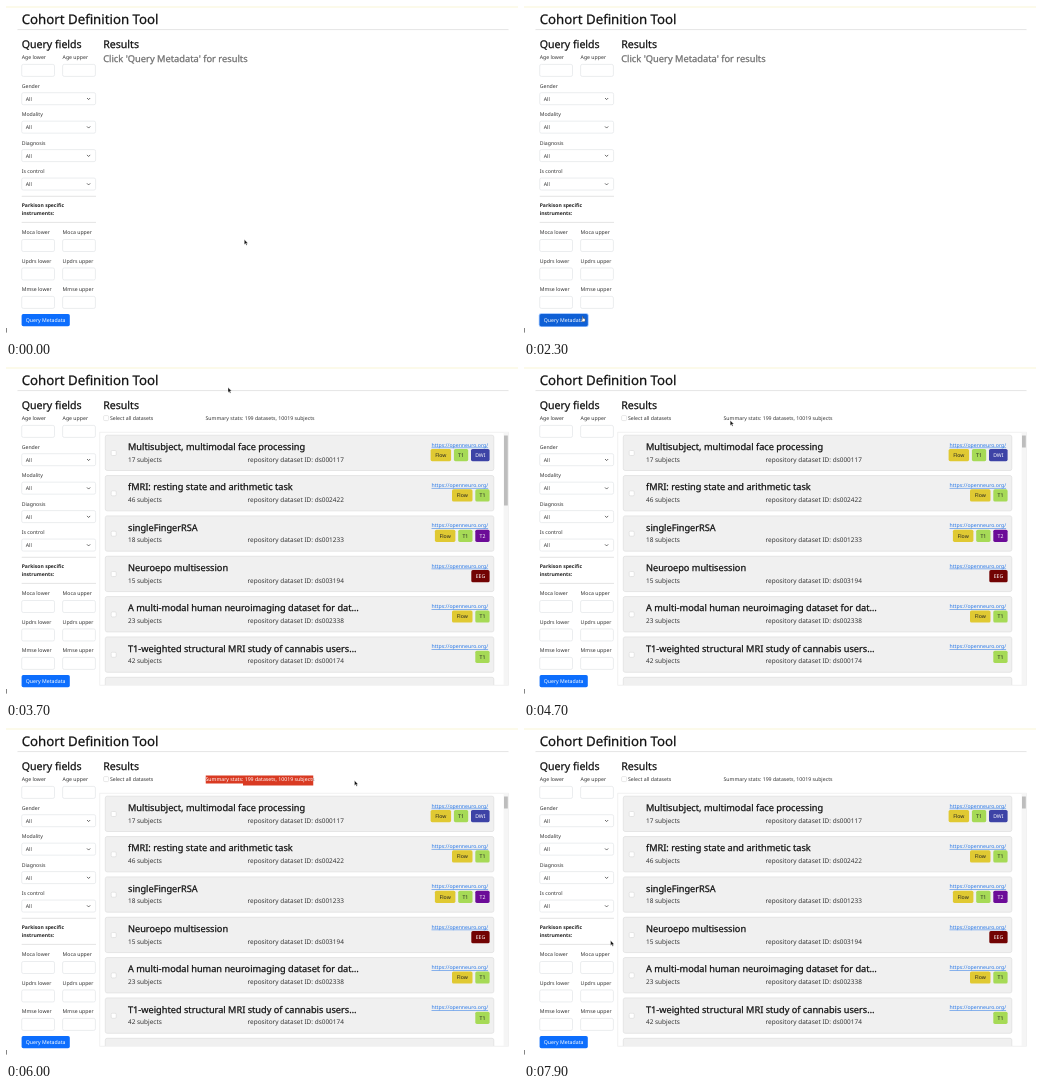
These frames come from a looping animation (512 by 333 pixels, 8000 ms). An HTML page:

```html
<!DOCTYPE html>
<html lang="en">
<head>
<meta charset="utf-8">
<title>Cohort Definition Tool</title>
<style>
  html, body { margin: 0; width: 100%; height: 100%; overflow: hidden; background: #fff; }
  svg { display: block; width: 512px; height: 333px; }
  text {
    font-family: "Noto Sans", "Open Sans", sans-serif;
    font-size: 5.2px; fill: #333; white-space: pre;
    text-rendering: geometricPrecision;
  }
  .h1, .h2, .lead, .title { fill: #111; stroke: #111; stroke-width: .25px; }
  .h1 { font-size: 13.25px; }
  .h2 { font-size: 10.6px; }
  .lead { font-size: 9.3px; fill: #6f6f6f; stroke: #6f6f6f; }
  .title { font-size: 9.2px; }
  .meta { font-size: 6.45px; }
  .bold { font-size: 5.05px; font-weight: 700; fill: #222; }
  .link { fill: #2878e8; text-decoration: underline; }
  .light { fill: #fff; }
  .dark { fill: #222; }
  .mid { text-anchor: middle; }
  .field { fill: #fff; stroke: #e2e5e8; stroke-width: .7px; }
  .check { fill: #fff; stroke: #d0d0d0; stroke-width: .5px; }
  .card { fill: #f0f0f0; stroke: #dfdfdf; stroke-width: .7px; }
  .rule { stroke: #dedede; stroke-width: .8px; }
</style>
</head>
<body>
<svg id="stage" viewBox="0 0 512 333" xmlns="http://www.w3.org/2000/svg"></svg>
<script>
const LOOP = 8000, STEP = 100;
const LEFT = 15.7, ROW = 28.45, CARD_ROW = 40.35;
const SUMMARY = "Summary stats: 199 datasets, 10019 subjects";
const SUMMARY_X = 199.5, SUMMARY_END = 307.5;

const text = (x, y, str, cls = "") => `<text x="${x}" y="${y}" class="${cls}">${str}</text>`;
const rect = (x, y, w, h, attrs = "") =>
  `<rect x="${x}" y="${y}" width="${w}" height="${h}" ${attrs}/>`;
const rule = (x1, x2, y) => `<line class="rule" x1="${x1}" x2="${x2}" y1="${y}" y2="${y}"/>`;
const field = (x, y, w) => rect(x, y, w, 12, 'rx="1.6" class="field"');
const checkbox = (x, y) => rect(x, y, 5, 5, 'rx="1.1" class="check"');
const rows = (items, y, gap, row) => items.map((item, i) => row(item, y + i * gap)).join("");

const rangeRow = (name, y) => [["lower", LEFT], ["upper", 56.6]]
  .map(([end, x]) => text(x, y, `${name} ${end}`) + field(x, y + 5.3, 32.8)).join("");

const selectRow = (name, y) =>
  text(LEFT, y, name) + field(LEFT, y + 4.9, 73.9) + text(19.8, y + 13, "All") +
  `<path d="M81 ${y + 10.2}l1.6 1.6l1.6-1.6" fill="none" stroke="#444" stroke-width=".8"/>`;

const form =
  text(LEFT, 42.2, "Query fields", "h2") +
  rangeRow("Age", 53.1) +
  rows(["Gender", "Modality", "Diagnosis", "Is control"], 81.8, ROW, selectRow) +
  rule(LEFT, 90, 190.3) +
  rows(["Parkison specific", "instruments:"], 201.4, 7.8, (s, y) => text(LEFT, y, s, "bold")) +
  rule(LEFT, 90, 216.4) +
  rows(["Moca", "Updrs", "Mmse"], 228.2, ROW, rangeRow) +
  rect(14.8, 307.2, 49.8, 13.9, 'rx="2.4" fill="#8fbcff" id="ring"') +
  rect(15.6, 308, 48.2, 12.3, 'rx="1.7" id="button"') +
  text(19.8, 316, "Query Metadata", "light");

const TAGS = {
  Flow: [20.5, "#e0c932", "dark"],
  T1: [14.3, "#a6da56", "dark"],
  T2: [14.3, "#6c0c98", "light"],
  DWI: [18.6, "#3d43a6", "light"],
  EEG: [18.3, "#720303", "light"]
};

// Tags are laid out from the right edge
function badges(names, y) {
  let right = 483.6;
  return names.split(" ").reverse().map(name => {
    const [w, fill, ink] = TAGS[name], x = right - w;
    right = x - 2.8;
    return rect(x, y, w, 12.2, `rx="1.6" fill="${fill}"`) +
      text(x + w / 2, y + 8, name, "mid " + ink);
  }).join("");
}

const DATASETS = [
  ["Multisubject, multimodal face processing", 17, "ds000117", "Flow T1 DWI"],
  ["fMRI: resting state and arithmetic task", 46, "ds002422", "Flow T1"],
  ["singleFingerRSA", 18, "ds001233", "Flow T1 T2"],
  ["Neuroepo multisession", 15, "ds003194", "EEG"],
  ["A multi-modal human neuroimaging dataset for dat…", 23, "ds002338", "Flow T1"],
  ["T1-weighted structural MRI study of cannabis users…", 42, "ds000174", "T1"]
];

const cardBox = y => rect(99.3, y, 388.5, 35.3, 'rx="1.8" class="card"');

const card = ([name, count, id, tags], y) =>
  cardBox(y) + checkbox(105.2, y + 15.3) +
  text(122, y + 14.8, name, "title") +
  text(122, y + 26.5, `${count} subjects`, "meta") +
  text(241.6, y + 26.5, `repository dataset ID: ${id}`, "meta") +
  text(425.5, y + 11.4, "https://openneuro.org/", "link") +
  badges(tags, y + 13.8);

const results =
  checkbox(97.6, 48.6) + text(104, 53.1, "Select all datasets") +
  text(SUMMARY_X, 53.1, SUMMARY) +
  `<g clip-path="url(#selected)">
    <path d="M${SUMMARY_X} 47.4H${SUMMARY_END}V57.6H237V55.6H${SUMMARY_X}Z" fill="#d93a22"/>
    ${text(SUMMARY_X, 53.1, SUMMARY, "light")}</g>` +
  rect(93.8, 65.2, 408.6, 253, 'fill="#fff" stroke="#ebebeb" stroke-width=".7"') +
  `<g clip-path="url(#list)">${rows(DATASETS, 68.2, CARD_ROW, card)}
    ${cardBox(68.2 + DATASETS.length * CARD_ROW)}</g>` +
  rect(497.6, 65.6, 4.6, 252.4, 'fill="#f5f5f5"') +
  rect(498, 68.5, 3.8, 0, 'fill="#bdbdbd" id="thumb"');

const $ = id => document.getElementById(id);

$("stage").innerHTML =
  `<defs><clipPath id="selected">${rect(SUMMARY_X, 46, 0, 13, 'id="selection"')}</clipPath>
   <clipPath id="list">${rect(94, 65.5, 404, 252.4)}</clipPath></defs>` +
  rect(0, 0, 512, 2, 'fill="#fcfaea"') +
  text(LEFT, 18, "Cohort Definition Tool", "h1") +
  rule(11.5, 502.5, 23.6) +
  text(97.2, 42.2, "Results", "h2") +
  form +
  `<g id="before">${text(97.2, 56.2, "Click 'Query Metadata' for results", "lead")}</g>
   <g id="after">${results}</g>` +
  rect(0, 322, 0.9, 4.6, 'fill="#777"') +
  `<g id="cursor">
    <path id="arrow" d="M0 0V4.9L1.2 3.9L2 5.7L2.9 5.3L2.1 3.6H3.6Z" fill="#111" stroke="#fff" stroke-width=".35"/>
    <path id="hand" d="M1.3 .3Q2 0 2.1 .8V2.2L4.2 2.8V4.4L3.6 5.7H1.6L.2 3.6L1.3 3.7Z" fill="#fff" stroke="#222" stroke-width=".4"/>
  </g>`;

// Pointer moves: start, end, x, y, ease-out power
const START = [238.3, 233.6];
const MOVES = [
  [100, 200, 281, 169],
  [500, 900, 265.5, 170],
  [1000, 1900, 57, 310, 2.8],
  [2900, 3300, 217, 54],
  [3400, 3700, 222, 20.5],
  [3700, 4300, 206, 49],
  [4400, 4700, 206.2, 53.5],
  [4700, 5300, 199.7, 51],
  [5300, 6000, 348.5, 52.6, 1.8],
  [6300, 6900, 199.3, 80.6],
  [7100, 7400, 194.3, 86.3],
  [7500, 7900, 86.6, 212.6]
];

const pointer = t => MOVES.reduce(([px, py], [from, to, x, y, power = 1]) => {
  const u = Math.min(1, Math.max(0, (t - from) / (to - from)));
  const k = 1 - (1 - u) ** power;
  return [px + (x - px) * k, py + (y - py) * k];
}, START);

const show = (id, on) => $(id).setAttribute("visibility", on ? "visible" : "hidden");

function draw() {
  const t = Math.floor((performance.now() % LOOP) / STEP) * STEP;
  const [x, y] = pointer(t);
  const loaded = t >= 3700;
  const hover = t >= 1900 && !loaded;
  const onButton = hover && t < 3000;
  const selecting = t >= 5400 && t < 6400;
  const visible = t < 3400 || loaded;

  show("before", !loaded);
  show("after", loaded);
  show("ring", t >= 2300 && !loaded);
  show("arrow", visible && !onButton);
  show("hand", onButton);
  $("button").setAttribute("fill", hover ? "#0f60d6" : "#0d6efd");
  $("thumb").setAttribute("height", t < 4100 ? 70 : 12);
  $("selection").setAttribute("width", selecting ? Math.min(x, SUMMARY_END) - SUMMARY_X : 0);
  $("cursor").setAttribute("transform", `translate(${x} ${y})`);
  requestAnimationFrame(draw);
}
draw();
</script>
</body>
</html>
```
